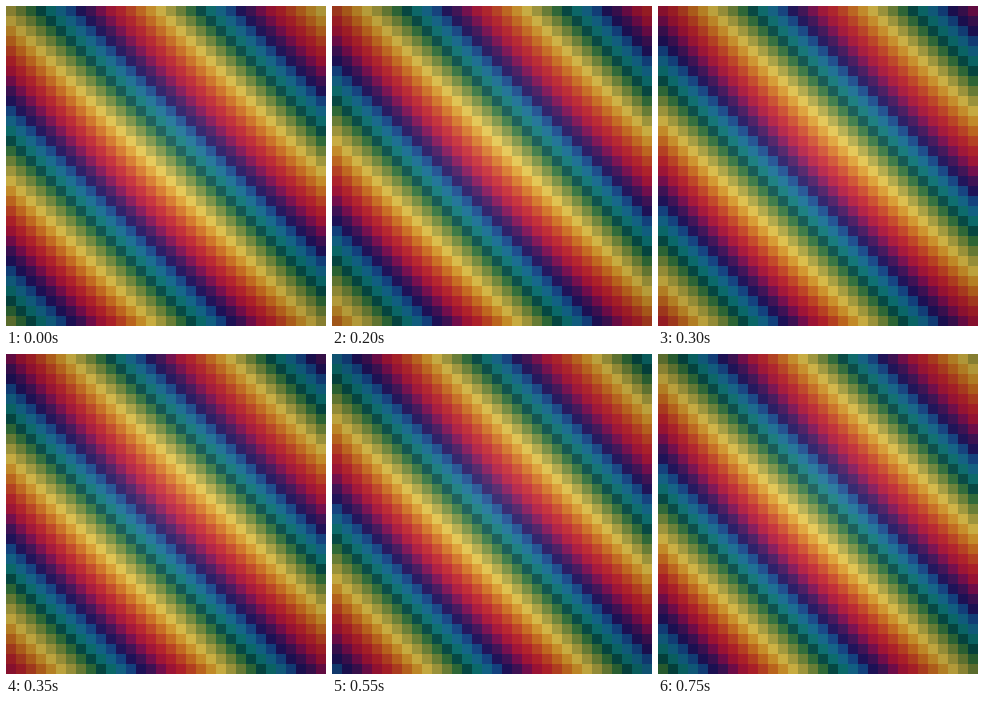
These frames come from a looping animation (320 px wide and 320 px high, 0.8 s). An HTML page with a canvas:

```html
<!DOCTYPE html>
<html lang="en">
<head>
<meta charset="utf-8">
<title>Rainbow stripes</title>
<style>
html, body { margin: 0; width: 100%; height: 100%; overflow: hidden; background: #000; }
canvas { display: block; width: 320px; height: 320px; }
</style>
</head>
<body>
<canvas id="stage" width="320" height="320"></canvas>
<script>
const LOOP = 800, CELL = 10, GRID = 32;
const palette = [
  '221466', '481462', '860f58', 'b8163e', 'cc2630', 'd44a26', 'dd7622', 'e6a32e',
  'eccb4c', 'b8ae44', '7a933e', '357a40', '06544e', '0c7c7c', '14719a', '164c94'
].map(h => [0, 2, 4].map(i => parseInt(h.slice(i, i + 2), 16)));
const N = palette.length;
const ctx = document.getElementById('stage').getContext('2d');

// Soft white glow near the middle, darker towards the corners.
function light(color, x, y) {
  const dist = cy => Math.hypot(x - 15.5, y - cy) / 16;
  const glow = 0.13 * Math.max(0, 1 - dist(13.5) / 1.1);
  const dim = 0.97 - 0.13 * dist(15.5) ** 2;
  return color.map(v => Math.round((v + (255 - v) * glow) * dim));
}

function draw(step) {
  for (let y = 0; y < GRID; y++) {
    for (let x = 0; x < GRID; x++) {
      const i = (x - y - step + 9 + 4 * N) % N;
      ctx.fillStyle = `rgb(${light(palette[i], x, y)})`;
      ctx.fillRect(x * CELL, y * CELL, CELL, CELL);
    }
  }
}

let last = -1;
function tick() {
  const step = Math.floor(performance.now() % LOOP / LOOP * N);
  if (step !== last) draw(last = step);
  requestAnimationFrame(tick);
}
tick();
</script>
</body>
</html>
```
